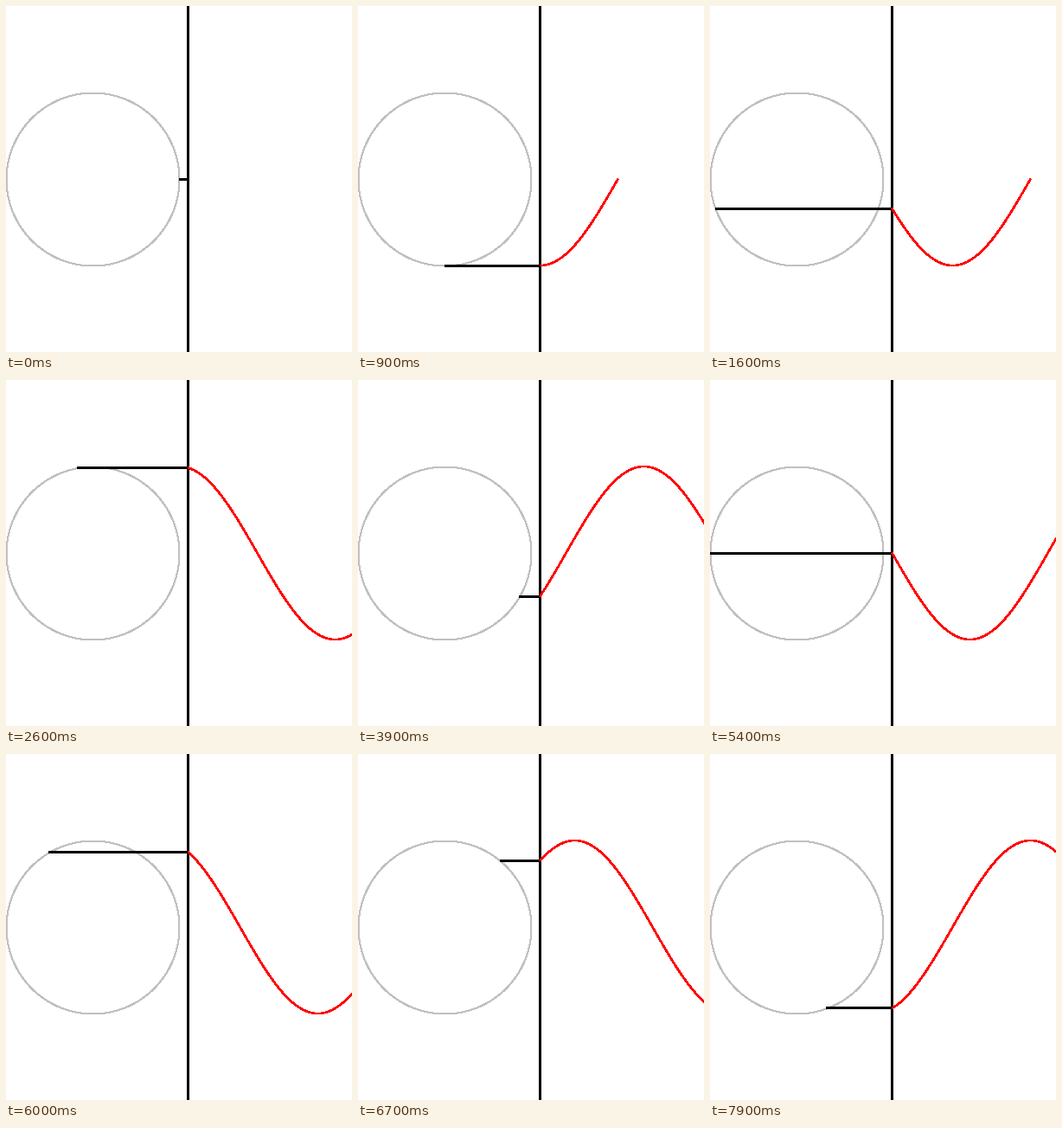
Animation of 400 by 400 pixels, one loop 8 s. Source, as a matplotlib script:

```python
import numpy as np
import matplotlib.pyplot as plt
from matplotlib.animation import FuncAnimation

SIZE, DPI = 400, 100
CX, CY, R = 100, 200, 100      # circle
AXIS_X = 210                   # wave starts here
STEP = 10                      # degrees and pixels per frame
FRAMES, INTERVAL = 80, 100

plt.rcParams["path.simplify"] = False
fig = plt.figure(figsize=(SIZE / DPI, SIZE / DPI), dpi=DPI, facecolor="white")
ax = fig.add_axes([0, 0, 1, 1])
ax.set(xlim=(0, SIZE), ylim=(SIZE, 0))
ax.axis("off")


def stroke(x, y, color, width):
    line, = ax.plot(x, y, color=color, lw=width * 72 / DPI, antialiased=False,
                    snap=False, solid_capstyle="butt")
    return line


turn = np.linspace(0, 2 * np.pi, 361)
stroke(CX + 0.5 + R * np.cos(turn), CY + 0.5 + R * np.sin(turn), "#c0c0c0", 1)
stroke([AXIS_X + 0.5] * 2, [0, SIZE], "black", 3)
arm = stroke([], [], "black", 3)
wave = stroke([], [], "red", 1.5)


def update(i):
    angle = np.radians(STEP * i % 360)
    x = int(CX + R * np.cos(angle))
    y = int(CY + R * np.sin(angle))
    arm.set_data([x, AXIS_X], [y + 0.5] * 2)

    # the newest value sits on the axis, older ones have moved right
    age = np.arange(min(STEP * i, SIZE - AXIS_X + 5) + 1)
    if i == 0:
        age = age[:0]
    wave.set_data(AXIS_X + 0.5 + age,
                  CY + R * np.sin(np.radians(STEP * i - age)))
    return arm, wave


anim = FuncAnimation(fig, update, frames=FRAMES, interval=INTERVAL,
                     repeat=True, repeat_delay=0, blit=False)
plt.show()
```
